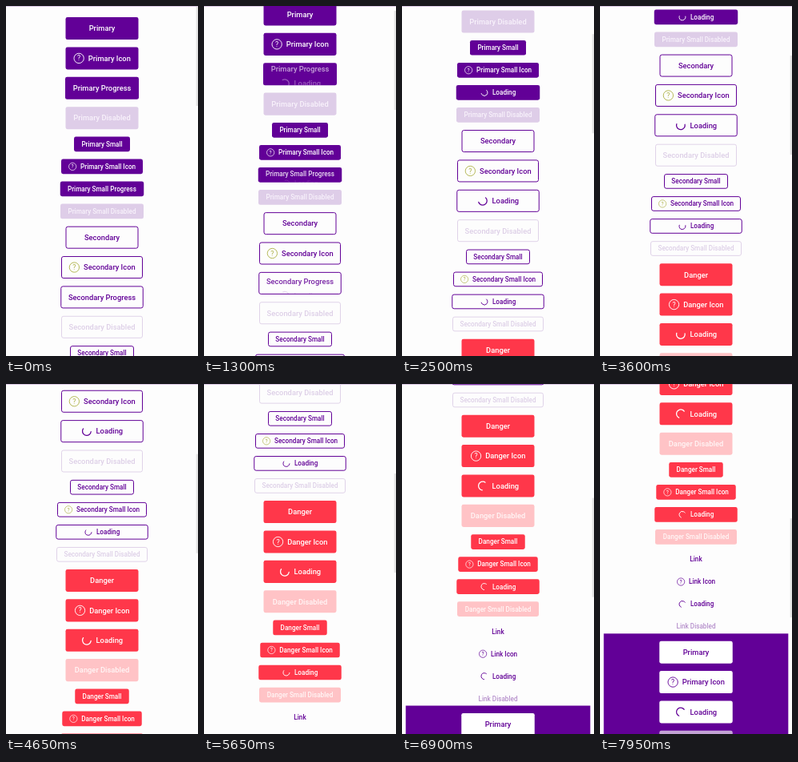
Animation of 240x438 px, one loop 8 s. Source, as an HTML page with a canvas:

```html
<!DOCTYPE html>
<html lang="en">
<head>
<meta charset="utf-8">
<title>Buttons</title>
<style>
  html, body { margin: 0; width: 100%; height: 100%; overflow: hidden; background: #fdfdfd; }
  canvas { display: block; width: 240px; height: 438px; }
</style>
</head>
<body>
<canvas id="stage"></canvas>
<script>
const W = 240, H = 438, LOOP = 8000;
const SCROLL_START = 1097, SCROLL_SPEED = 0.0859;   // ms, px per ms
const SLIDE_TIME = 300;
const DP = 0.584, GAP = 16 * DP;
const PURPLE = '#620097', RED = '#ff374a', WHITE = '#ffffff', OLIVE = '#b0b44c';

const canvas = document.getElementById('stage');
const ctx = canvas.getContext('2d');
const ratio = window.devicePixelRatio || 1;
canvas.width = W * ratio;
canvas.height = H * ratio;

const styles = {
  Primary:   { fill: PURPLE, text: WHITE, offFill: '#decde8', offText: '#f8f2fb' },
  Secondary: { border: PURPLE, text: PURPLE, icon: OLIVE, offBorder: '#e0d3e9', offText: '#ddcfe7' },
  Danger:    { fill: RED, text: WHITE, offFill: '#ffc3c6', offText: '#fff6f6' },
  Link:      { text: PURPLE, offText: '#b58fcb' },
  Inverse:   { fill: WHITE, text: PURPLE, offFill: '#c3a3d5', offText: '#8a44b0' }
};
const kinds = ['', ' Icon', ' Progress', ' Disabled'];

// Widths are listed in the order of kinds.
const groups = [
  ['Primary', false, [91, 91, 92, 91]],
  ['Primary', true, [70, 102, 104.5, 104]],
  ['Secondary', false, [91, 102, 103.5, 102]],
  ['Secondary', true, [80, 112, 115.5, 114]],
  ['Danger', false, [91, 91, 91, 91]],
  ['Danger', true, [67.5, 99.5, 103.5, 102]],
  ['Link', true, [80, 80, 80, 80]],
  ['Inverse', false, [91.5, 91.5, 91.5, 91.5]]
];

const buttons = [];
let nextTop = 24 * DP, panelTop = 0;
for (const [name, small, widths] of groups) {
  const inverse = name === 'Inverse';
  if (inverse) {
    panelTop = nextTop - GAP - 0.6;
    nextTop = panelTop + GAP;
  }
  const h = (small ? 32 : 48) * DP;
  kinds.forEach((kind, i) => {
    const title = (inverse ? 'Primary' : name) + (small && name !== 'Link' ? ' Small' : '');
    buttons.push({
      style: styles[name], small, kind, h, w: widths[i], top: nextTop,
      label: title + kind,
      loadStart: name === 'Primary' && !small ? 1180 : 1231
    });
    nextTop += h + GAP;
  });
}

function box(x, y, w, h, fill, border) {
  ctx.beginPath();
  ctx.roundRect(x, y, w, h, 2.4);
  if (fill) { ctx.fillStyle = fill; ctx.fill(); }
  if (border) { ctx.strokeStyle = border; ctx.lineWidth = 1; ctx.stroke(); }
}

function helpIcon(x, y, size, color) {
  ctx.strokeStyle = color;
  ctx.lineWidth = size / 15;
  ctx.beginPath();
  ctx.arc(x, y, size * 0.44, 0, Math.PI * 2);
  ctx.stroke();
  ctx.fillStyle = color;
  ctx.font = `400 ${size * 0.62}px Roboto, sans-serif`;
  ctx.textAlign = 'center';
  ctx.fillText('?', x, y + size * 0.22);
}

function spinner(x, y, size, color, t) {
  const middle = (57 + (t - 2500) * 0.36) * Math.PI / 180;
  ctx.strokeStyle = color;
  ctx.lineWidth = size / 11;
  ctx.lineCap = 'round';
  ctx.beginPath();
  ctx.arc(x, y, size * 0.38, middle - 1.83, middle + 1.83);
  ctx.stroke();
}

// Centred line of text with an optional symbol before it.
function content(b, label, symbol, y, color, alpha, t) {
  const fontSize = (b.small ? 14 : 16) * DP;
  const size = b.small ? 10.5 : 14;
  const lead = symbol ? size + 8 * DP : 0;
  const font = `500 ${fontSize}px Roboto, sans-serif`;
  ctx.globalAlpha = alpha;
  ctx.font = font;
  const left = W / 2 - (ctx.measureText(label).width + lead) / 2;
  if (symbol === 'icon') helpIcon(left + size / 2, y, size, b.style.icon || color);
  if (symbol === 'spinner') spinner(left + size / 2, y, size, color, t);
  ctx.font = font;
  ctx.textAlign = 'left';
  ctx.fillStyle = color;
  ctx.fillText(label, left + lead, y + fontSize * 0.355);
  ctx.globalAlpha = 1;
}

function drawButton(b, y, t) {
  const s = b.style, off = b.kind === ' Disabled';
  const x = (W - b.w) / 2, middle = y + b.h / 2;
  const border = off ? s.offBorder : s.border;
  const inset = border ? 0.5 : 0;
  box(x + inset, y + inset, b.w - 2 * inset, b.h - 2 * inset, off ? s.offFill : s.fill, border);

  const color = off ? s.offText : s.text;
  if (b.kind !== ' Progress') {
    content(b, b.label, b.kind === ' Icon' && 'icon', middle, color, 1, t);
    return;
  }
  const u = Math.min(1, Math.max(0, (t - b.loadStart) / SLIDE_TIME));
  const p = u * u * (3 - 2 * u), travel = b.h * 0.66;
  ctx.save();
  ctx.beginPath();
  ctx.rect(x, y, b.w, b.h);
  ctx.clip();
  if (p < 1) content(b, b.label, null, middle - p * travel, color, 1 - p, t);
  if (p > 0) content(b, 'Loading', 'spinner', middle + (1 - p) * travel, color, p, t);
  ctx.restore();
}

function draw(t) {
  const scroll = Math.max(0, t - SCROLL_START) * SCROLL_SPEED;
  ctx.setTransform(ratio, 0, 0, ratio, 0, 0);
  ctx.fillStyle = '#fdfdfd';
  ctx.fillRect(0, 0, W, H);

  ctx.fillStyle = '#d9c6e3';
  ctx.fillRect(0, 0, W, 1);
  ctx.fillStyle = PURPLE;
  ctx.fillRect(8 * DP, panelTop - scroll, W - 16 * DP, 400);

  for (const b of buttons) {
    const y = b.top - scroll;
    if (y < H && y + b.h > 0) drawButton(b, y, t);
  }

  ctx.fillStyle = '#e4e4e4';
  ctx.fillRect(237.6, 1 + scroll * 0.284, 2.4, 124);
}

function tick() {
  draw(performance.now() % LOOP);
  requestAnimationFrame(tick);
}
tick();
</script>
</body>
</html>
```
